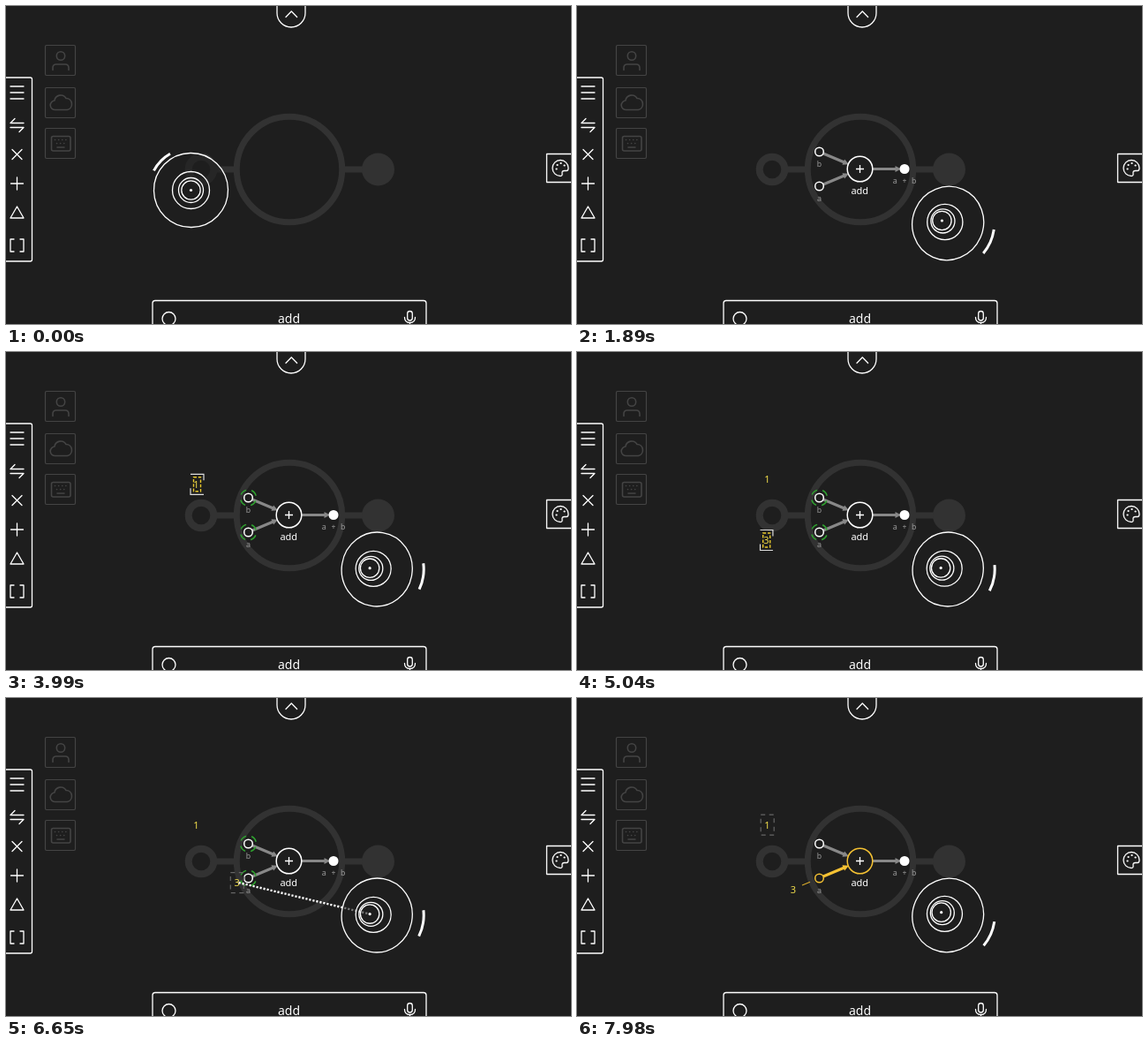
An HTML page that plays this animation: 640 by 360 pixels, repeating every 8 s.

```html
<!DOCTYPE html>
<html lang="en">
<head>
<meta charset="utf-8">
<title>Add node</title>
<style>
html, body { margin: 0; width: 100%; height: 100%; overflow: hidden; background: #1e1e1e; }
svg { display: block; width: 640px; height: 360px; }
text { text-anchor: middle; font-family: "Noto Sans", "Open Sans", sans-serif; fill: #fff; }
.mono { font: 9px "Noto Sans Mono", "DejaVu Sans Mono", monospace; fill: #999; }
.num { font: 11px "Noto Sans", "Open Sans", sans-serif; fill: #f0dc4a; }
.ui, .pad { fill: none; stroke: #fff; stroke-width: 1.3; stroke-linecap: round; stroke-linejoin: round; }
.dim { fill: none; stroke: #444; stroke-width: 1.2; stroke-linecap: round; stroke-linejoin: round; }
.wire { fill: none; stroke: #888; stroke-width: 3; }
.ok { fill: none; stroke: #2fa32f; stroke-width: 1.4; stroke-dasharray: 8 6.14; }
</style>
</head>
<body>
<svg viewBox="0 0 640 360">
  <rect width="640" height="360" fill="#1e1e1e"/>
  <g fill="none" stroke="#323232" stroke-width="7">
    <circle cx="321" cy="185" r="59.7"/>
    <circle cx="221" cy="185" r="14.3" stroke-width="8"/>
    <path d="M238 185H259M383 185H405"/>
    <circle cx="421.5" cy="185" r="18.5" fill="#323232" stroke="none"/>
  </g>

  <g class="dim">
    <rect x="44.5" y="44.5" width="34" height="34" rx="1.5"/>
    <rect x="44.5" y="92.5" width="34" height="34" rx="1.5"/>
    <rect x="44.5" y="138.5" width="34" height="34" rx="1.5"/>
    <g stroke-width="1.6">
      <circle cx="62" cy="56.5" r="4.7"/>
      <path d="M53 72.500V70q0-4 4-4h10q4 0 4 4v2.500"/>
      <path d="M56 117.500a5 5 0 0 1-1-10.500a7 7 0 0 1 13-2.500a6.600 6.600 0 0 1 1.500 13z"/>
      <rect x="51.500" y="147.500" width="21.500" height="16.500" rx="2"/>
      <path d="M55.500 151.500h.1m4 0h.1m4 0h.1m4 0h.1M57.500 155.500h.1m4 0h.1m4 0h.1M58 160h8"/>
    </g>
  </g>

  <g class="ui">
    <path d="M307 -2V8a16 16 0 0 0 32 0V-2M317 12.500l6.300-6.500l6.300 6.500"/>
    <rect x="-6" y="81" width="35.500" height="208" rx="2"/>
    <path d="M5 91H20M5 98H20M5 105H20"/>
    <path d="M20 132.500H5l5-5M5 137.500H20l-5 5"/>
    <path d="M7 162.500l11 11M18 162.500l-11 11M12.500 194v14M5.500 201h14"/>
    <path d="M12.500 227l7.500 13H5zM9 264H5v14H9M16 264h4v14h-4"/>
    <rect x="612.500" y="167.500" width="40" height="32"/>
    <path d="M628 174.500a9 9 0 1 0 0 18q2.500 0 2-3q-.5-3 2.500-3h2.500q2 0 2-3a9 9 0 0 0-9-9z"/>
    <path d="M623.500 184.500h.1M624.500 180h.1M628.500 178h.1M632.500 180.500h.1" stroke-width="2.2"/>
    <rect x="166" y="333.500" width="310" height="40" rx="3"/>
    <circle cx="184.500" cy="354" r="7.500"/>
    <rect x="454.700" y="345.500" width="5.600" height="10.500" rx="2.800"/>
    <path d="M451.500 352.500q0 6 6 6q6 0 6-6M457.500 358.500v4"/>
  </g>
  <text x="320.500" y="359" font-size="14">add</text>

  <g id="node">
    <path class="wire" d="M279 167L304 177.500"/>
    <path d="M308 179.300l-7.600.5l2.700-6.300z" fill="#888"/>
    <g id="hot">
      <path id="wireA" class="wire" d="M279 202L304 191.500"/>
      <path id="headA" d="M308 189.700l-7.600-.5l2.700 6.300z"/>
    </g>
    <path class="wire" d="M335 184.500H362"/>
    <path d="M367 184.500l-6.500-3.500v7z" fill="#888"/>
    <g fill="#1e1e1e" stroke="#fff" stroke-width="1.500">
      <circle id="hub" cx="320.500" cy="184.500" r="14.300"/>
      <circle cx="274.500" cy="165" r="4.800"/>
      <circle id="inA" cx="274.500" cy="204" r="4.800"/>
      <circle cx="371" cy="184.500" r="4.800" fill="#fff"/>
      <path d="M316 184.500h9M320.500 180v9" stroke-width="1.300"/>
    </g>
    <text x="320.300" y="212.500" font-size="11">add</text>
    <text class="mono" x="274.500" y="182">b</text>
    <text class="mono" x="274.500" y="221">a</text>
    <text class="mono" x="371" y="201">a + b</text>
    <g id="ok">
      <circle class="ok" cx="274.500" cy="165" r="9" transform="rotate(22 274.500 165)"/>
      <circle class="ok" cx="274.500" cy="204" r="9" transform="rotate(22 274.500 204)"/>
    </g>
  </g>

  <g id="edit" fill="none">
    <path id="corners" stroke="#ddd" stroke-width="1.200"/>
    <rect id="field" stroke="#e8c82c" stroke-width="1.400" stroke-dasharray="3.500 1.800"/>
  </g>
  <rect id="hover" width="15" height="23" fill="none" stroke="#666" stroke-width="1.200" stroke-dasharray="5 4.500"/>
  <path id="link" d="M255 212L264 208.300" stroke="#d9ab2b" stroke-width="1.200"/>
  <text id="one" class="num">1</text>
  <text id="three" class="num">3</text>
  <path id="line" fill="none" stroke="#fff" stroke-width="2.400" stroke-dasharray="2.200 1.900"/>

  <g class="pad">
    <ellipse id="disc" fill="#1e1e1e" fill-opacity=".6"/>
    <circle id="r1"/><circle id="r2"/><circle id="r3"/>
    <circle id="dot" r="1.600" fill="#fff" stroke="none"/>
    <path id="arc" stroke-width="3" stroke-linecap="butt"/>
  </g>
</svg>
<script>
const LOOP = 8000, STEP = 70, RAD = Math.PI / 180, GOLD = "#f5c233";
const el = {};
document.querySelectorAll("[id]").forEach(e => el[e.id] = e);

const set = (id, attrs) => { for (const k in attrs) el[id].setAttribute(k, attrs[k]); };
const show = (id, on) => { el[id].style.display = on ? "" : "none"; };
const mix = (a, b, p) => a + (b - a) * p;
const smooth = p => p * p * (3 - 2 * p);
const out = p => 1 - Math.pow(1 - p, 3.4);
// progress through a run whose first step already shows a change
const run = (t, a, b) => Math.min(1, Math.max(0, (t - a + STEP) / (b - a + STEP)));

function padState(t) {
  const go = smooth(run(t, 70, 560));
  const pull = out(run(t, 1540, 2310));
  let ang = mix(224, 209, go);
  if (t >= 1540) ang = 24;
  ang += mix(0, -15, smooth(run(t, 3220, 3990)));
  ang += mix(0, 2, smooth(run(t, 4340, 5110)));
  ang += mix(0, 13, out(run(t, 7350, 7980)));
  const sway = (a, b) => Math.sin(Math.PI * run(t, a, b));
  ang += 2 * sway(5530, 6300) - sway(6440, 7140);
  return { x: mix(209.5, 420.2, go), y: mix(208.5, 246, go), ang, pull };
}

function drawPad({ x, y, ang, pull }) {
  const c = Math.cos(ang * RAD), s = Math.sin(ang * RAD), off = -8.2 * pull;
  const at = k => ({ cx: x + off * c * k, cy: y + off * s * k });
  set("disc", { cx: x, cy: y, rx: 42 - 2 * pull, ry: 42, transform: `rotate(${ang} ${x} ${y})` });
  set("r1", { ...at(.5), r: 21 - pull });
  set("r2", { ...at(.85), r: 14 - .5 * pull });
  set("r3", { ...at(1), r: 10.7 });
  set("dot", at(1));
  const r = 47.5 + 5.5 * pull;
  const end = d => `${x + r * Math.cos((ang + d) * RAD)} ${y + r * Math.sin((ang + d) * RAD)}`;
  set("arc", { d: `M${end(-16.3)}A${r} ${r} 0 0 1 ${end(16.3)}` });
  return at(1);
}

// selection brackets with the text field inside
function drawEdit(x, y, half, w) {
  const l = x - half, r = x + half, t = y - 11.5, b = y + 11.5;
  set("corners", { d: `M${l} ${t}H${r}V${t + 7}M${l} ${b - 7}V${b}H${r}` });
  set("field", { x: x - w / 2, y: y - 8, width: w, height: 16 });
}

function draw(t) {
  const tip = drawPad(padState(t));
  const linked = t >= 6930;
  show("node", t >= 840);
  show("ok", t >= 3430 && t < 5600 || t >= 6440 && !linked);

  const typed1 = t >= 3360, typed3 = t >= 4620;
  const edit1 = t >= 2800 && t < 4060, edit3 = t >= 4340 && t < 5530;
  show("edit", edit1 || edit3);
  if (edit1) drawEdit(216.5, 149.8, typed1 ? 7.5 : 6.2, typed1 ? 8 : 6);
  if (edit3) drawEdit(214.7, 213, typed3 ? 7.2 : 6.2, typed3 ? 8 : 6);

  const p = out(run(t, 6440, 6860));
  const drag = out(run(t, 6440, 7140));
  const tx = linked ? 245 : mix(214.5, 274.5, drag);
  const ty = linked ? 216.7 : mix(213, 208.8, p);
  show("one", typed1);
  set("one", { x: 215.5, y: t < 4340 ? 154 : 148.2 });
  show("three", typed3);
  set("three", { x: tx, y: ty + 4 });

  const over3 = t >= 5740 && !linked, over1 = t >= 7630;
  show("hover", over3 || over1);
  set("hover", over1 ? { x: 208.2, y: 132.2 } : { x: tx - 7.3, y: ty - 11.5 });

  // dotted tether between the pad and its remote cursor
  let to = null;
  if (t >= 2380 && t < 2800) to = t < 2450 ? [300, 186.500] : t < 2730 ? [246, 160] : [217, 150];
  else if (t >= 4060 && t < 4340) to = t < 4130 ? [290, 225] : [215, 213];
  else if (t >= 5180 && t < 5530) to = [mix(413, 218, run(t, 5180, 5320)), mix(244, 213, run(t, 5180, 5320))];
  else if (t >= 6440 && !linked) to = [tx + 2, ty];
  show("line", to);
  if (to) set("line", { d: `M${to}L${tip.cx} ${tip.cy}` });

  show("link", linked);
  el.wireA.style.stroke = el.headA.style.fill = linked ? GOLD : "#888";
  el.hub.style.stroke = el.inA.style.stroke = linked ? GOLD : "#fff";
}

const start = performance.now();
function tick() {
  const t = (performance.now() - start) % LOOP;
  draw(Math.floor(t / STEP) * STEP);
  requestAnimationFrame(tick);
}
draw(0);
requestAnimationFrame(tick);
</script>
</body>
</html>
```
